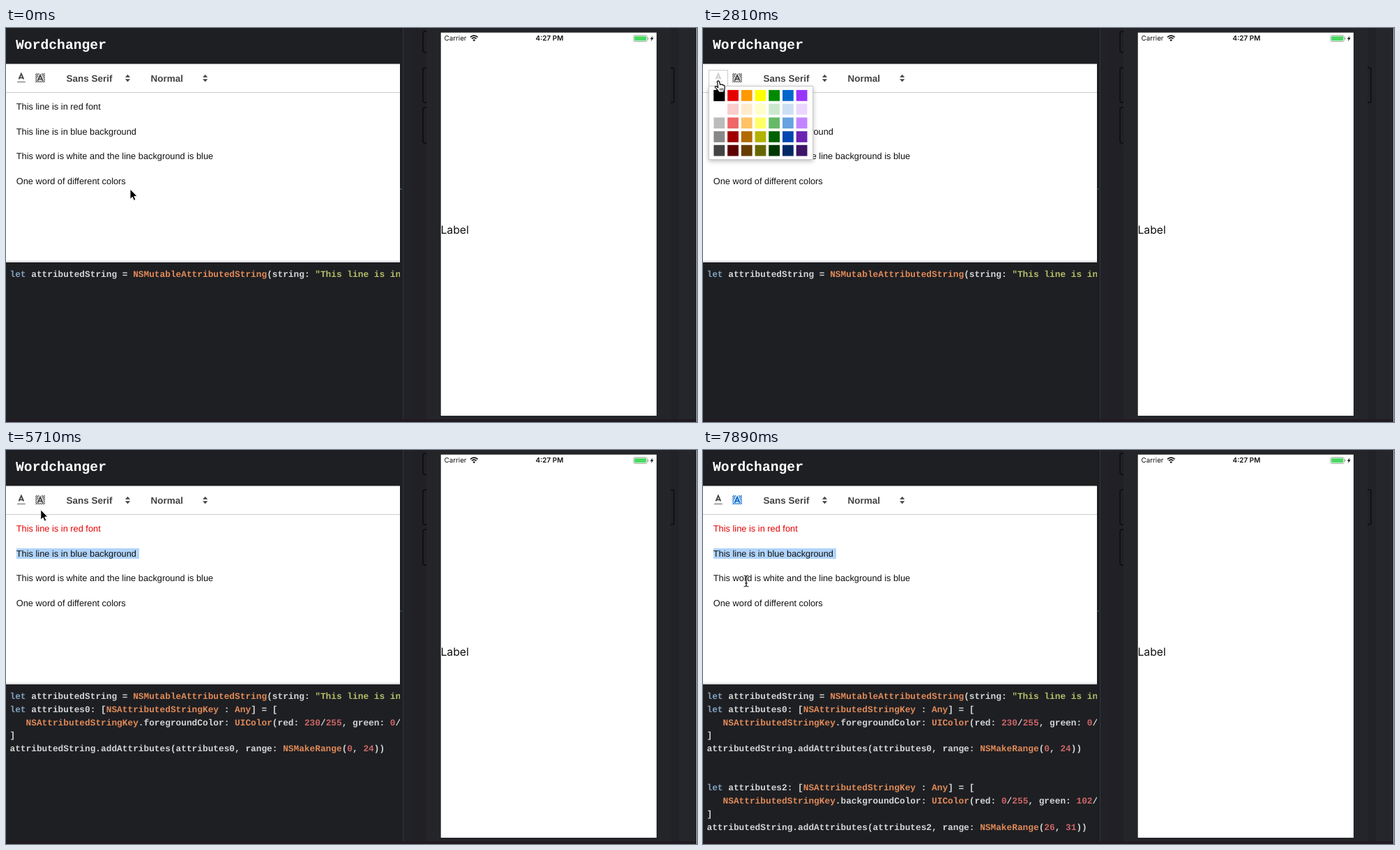
These frames come from a looping animation (991 px wide and 565 px high, 8000 ms). An HTML page:

```html
<!DOCTYPE html>
<html lang="en">
<head>
<meta charset="utf-8">
<title>Attributed string editor</title>
<style>
html, body { margin: 0; width: 100%; height: 100%; overflow: hidden; background: #1e1f23; }
svg { display: block; width: 991px; height: 565px; }
text { white-space: pre; text-rendering: geometricPrecision; }
.editor { font: 12.8px "Liberation Sans", Arial, sans-serif; fill: #111; }
.tool { font: bold 13.5px "Liberation Sans", Arial, sans-serif; fill: #444; }
.code { font: bold 12.8px "Liberation Mono", monospace; fill: #d3d5d4; }
.title { font: bold 19.7px "Liberation Mono", monospace; fill: #fff; }
.phone { font: 10px Inter, Roboto, sans-serif; fill: #111; }
.picker { filter: drop-shadow(0 2px 3px rgba(0, 0, 0, .28)); }
</style>
</head>
<body>
<svg id="stage" viewBox="0 0 991 565" xmlns="http://www.w3.org/2000/svg"></svg>
<script>
const LOOP = 8000;
const stage = document.getElementById('stage');
const rect = (x, y, w, h, fill, more = '') =>
  `<rect x="${x}" y="${y}" width="${w}" height="${h}" fill="${fill}" ${more}/>`;
const label = (cls, x, y, str, more = '') => `<text class="${cls}" x="${x}" y="${y}" ${more}>${str}</text>`;

// Code panel
const paint = { kw: '#81a2be', type: '#e08a58', str: '#b5bd68', num: '#cc6666' };
const kindOf = s => s[0] === '"' ? 'str' : s === 'let' ? 'kw' : /^\d/.test(s) ? 'num' : 'type';
const highlight = line => line.replace(/"[^"]*|\blet\b|\bNS\w+|\bUIColor\b|\bAny\b|\b\d+\b/g,
  s => `<tspan fill="${paint[kindOf(s)]}">${s}</tspan>`);
const codeLines = (lines, row) => lines.map((line, i) =>
  label('code', 5.5, 357 + (row + i) * 18.75, highlight(line))).join('');
const attributeBlock = (n, key, color, range) => [
  `let attributes${n}: [NSAttributedStringKey : Any] = [`,
  `   NSAttributedStringKey.${key}: UIColor(${color}`,
  ']',
  `attributedString.addAttributes(attributes${n}, range: NSMakeRange(${range}))`
];

// Colour picker
const swatches = [
  '#000 #e60000 #f90 #ff0 #008a00 #06c #93f',
  '#fff #facccc #ffebcc #ffffcc #cce8cc #cce0f5 #ebd6ff',
  '#bbb #f06666 #ffc266 #ff6 #66b966 #66a3e0 #c285ff',
  '#888 #a10000 #b26b00 #b2b200 #006100 #0047b2 #6b24b2',
  '#444 #5c0000 #663d00 #660 #003700 #002966 #3d1466'
].map(row => row.split(' '));
const PITCH = 19.72, CELL = 15.8;
const cellX = (left, col) => left + 7.4 + col * PITCH;
const cellY = row => 88.9 + row * PITCH;
const border = (x, y) => rect(x + .5, y + .5, CELL - 1, CELL - 1, 'none', 'stroke="#000"');
const picker = (id, left, pickedRow) => `<g id="${id}">
  ${rect(left + .5, 60.5, 27, 24, '#fff', 'stroke="#ccc"')}
  ${rect(left + .5, 83.5, 149, 105, '#fff', 'stroke="#ccc" class="picker"')}
  ${swatches.map((row, r) => row.map((c, i) => rect(cellX(left, i), cellY(r), CELL, CELL, c)).join('')).join('')}
  ${border(cellX(left, 0), cellY(pickedRow))}</g>`;

// Toolbar icons
const letterA = dy => `M5.5 ${11 + dy}L9 ${3 + dy}L12.5 ${11 + dy}M6.4 ${9 + dy}H11.6`;
const icons = `
  <g id="ink" transform="translate(13 62.6) scale(.985)" fill="none">
    <path d="${letterA(0)}" stroke="currentColor" stroke-width="1.8"/>
    <path id="inkBar" d="M3 15H15" stroke-width="2" opacity=".5"/></g>
  <g id="fill" transform="translate(40.2 62.6) scale(.985)" fill="none">
    <g clip-path="url(#iconBox)"><path stroke="currentColor" stroke-width="1.1"
      d="${Array.from({ length: 11 }, (_, i) => `M${i * 2.8 - 12} 16l14-14`).join('')}"/></g>
    <path d="${letterA(2)}" stroke="#fff" stroke-width="4"/>
    <path d="${letterA(2)}" stroke="currentColor" stroke-width="1.9"/></g>`;
const arrows = x => `<path d="M${x - 3.6} 70.8L${x} 66.8L${x + 3.6} 70.8ZM${x - 3.6} 73.3L${x} 77.3L${x + 3.6} 73.3Z" fill="#444"/>`;

// Simulator side
const outline = (x, y, h, dir) =>
  `<path d="M${x + 5 * dir} ${y}H${x + 3 * dir}Q${x} ${y} ${x} ${y + 3}V${y + h - 3}Q${x} ${y + h} ${x + 3 * dir} ${y + h}H${x + 5 * dir}" fill="none" stroke="#0c0c0f" stroke-width="1.4"/>`;
const simulator = `
  ${rect(565, 0, 426, 565, '#25262b')}${rect(565, 0, 4, 565, '#1d1e22')}${rect(569, 0, 1, 565, '#33343d')}
  ${rect(570, 0, 13, 565, '#212227')}${rect(583, 0, 20, 565, '#202025')}${rect(603, 0, 350, 565, '#242529')}
  ${rect(953, 0, 12, 565, '#212227')}
  ${outline(598, 5, 30, 1)}${outline(598, 57, 50, 1)}${outline(598, 114, 51, 1)}${outline(958, 57, 50, -1)}
  ${rect(0, 561, 991, 4, '#211b21')}${rect(990.2, 0, .8, 565, '#ddd')}
  ${rect(623.7, 6.6, 309.3, 549.4, '#fff')}
  ${label('phone', 628.5, 18.4, 'Carrier', 'style="font-size:9.8px"')}
  ${label('phone', 779.5, 18.4, '4:27 PM', 'text-anchor="middle" style="font-weight:600"')}
  ${label('phone', 623.4, 295.2, 'Label', 'style="font-size:15.8px"')}
  <g fill="none" stroke="#111" stroke-width="1.7"><path d="M666 13.2Q671.2 8.6 676.6 13.2M668 15.4Q671.2 12.4 674.6 15.4"/></g>
  <path d="M669.4 17L671.2 19.2L673.1 17Q671.2 15.6 669.4 17Z" fill="#111"/>
  ${rect(900, 10.5, 19.4, 9, 'none', 'rx="2" stroke="#999" stroke-width=".8"')}
  ${rect(901.2, 11.7, 17, 6.6, '#4cd964', 'rx="1"')}${rect(920.3, 13.4, 1.2, 3.2, '#999', 'rx=".6"')}
  <path d="M927.6 11L923.8 15.7H926L924.9 19.2L928.8 14.3H926.5Z" fill="#111"/>
  <path id="dot" d="M565 231H568" stroke="#2e7a55" stroke-width="1.4"/>`;

// Pointers, drawn around their hot spot
const beam = 'M-3.4-8Q-.6-8 0-6.4Q.6-8 3.4-8M0-6.6V6.6M-3.4 8Q-.6 8 0 6.4Q.6 8 3.4 8M-1.8 3H1.8';
const pointers = `
  <path id="arrow" d="M0 0V14.5L3.3 11.4L5.4 16.4L8 15.3L5.8 10.4H10.2Z" fill="#000" stroke="#fff"/>
  <g id="beam" fill="none"><path d="${beam}" stroke="#fff" stroke-width="2.4" opacity=".7"/><path d="${beam}" stroke="#000" stroke-width="1.2"/></g>
  <g id="hand" stroke="#000" stroke-linejoin="round">
    <path d="M-1.6 1C-1.2-.4 .8-.4 1.3 1L2.6 5.4C3 4.5 4.6 4.5 5 5.6C5.6 4.9 6.8 5.2 7 6.2C8 5.8 8.9 6.4 9 7.6L9.2 10C9.2 12 8 13 7.8 16H.8C.6 14.5-1.4 13-4.6 9C-5.2 7.6-3.6 6.8-2.4 8L-.4 9.6Z" fill="#fff" stroke-width="1.2"/>
    <path d="M2.4 10.5L2.7 13.6M4.5 10.3V13.6M6.5 10.2L6.3 13.6" stroke-width=".8"/></g>`;

const rows = [117, 152.5, 188, 223.5];
stage.innerHTML = `
  <defs><clipPath id="left"><rect width="565" height="565"/></clipPath>
    <clipPath id="iconBox"><rect x="2" y="2.4" width="14" height="13.4"/></clipPath></defs>
  ${rect(0, 0, 991, 565, '#1e1f23')}
  ${simulator}
  ${label('title', 14, 29.6, 'Wordchanger')}
  ${rect(0, 51.5, 565, 284.5, '#fff')}${rect(0, 92, 565, 1, '#ccc')}${rect(0, 334, 565, 1, '#ccc')}
  ${label('tool', 86.4, 77, 'Sans Serif')}${arrows(174.5)}${label('tool', 207.4, 77, 'Normal')}${arrows(285.7)}
  ${rect(15, 141, 172, 15, '#4a96e8', 'id="marked"')}
  ${rect(0, 0, 0, 15, '#b0d4fb', 'id="selection"')}
  ${['This line is in red font', 'This line is in blue background',
    'This word is white and the line background is blue', 'One word of different colors']
    .map((s, i) => label('editor', 14.8, rows[i], s, `id="line${i}"`)).join('')}
  <g clip-path="url(#left)">
    ${codeLines(['let attributedString = NSMutableAttributedString(string: "This line is in red font'], 0)}
    <g id="block0">${codeLines(attributeBlock(0, 'foregroundColor', 'red: 230/255, green: 0/255', '0, 24'), 1)}</g>
    <g id="block1">${codeLines(attributeBlock(2, 'backgroundColor', 'red: 0/255, green: 102/255', '26, 31'), 7)}</g>
  </g>
  ${picker('inkPicker', 8, 0)}${picker('fillPicker', 35.5, 1)}
  ${icons}
  <g id="hover">${border(0, 0)}</g>
  <g id="pointer">${pointers}</g>`;

const el = {};
stage.querySelectorAll('[id]').forEach(n => el[n.id] = n);
const show = (node, on) => node.setAttribute('display', on ? 'inline' : 'none');

// Pointer trips: first step, last step, number of steps, destination
const trips = [
  [90, 90, 1, 165, 217], [240, 330, 2, 134, 132], [600, 960, 5, 117, 124], [1340, 1340, 1, 110, 116],
  [1940, 2300, 5, 49, 82], [2470, 2640, 3, 22, 76], [3170, 3530, 5, 41, 94], [4080, 4470, 5, 53, 152],
  [5450, 5880, 6, 49, 69], [6400, 6840, 6, 145, 96], [7410, 7890, 6, 62, 188]
];
const ease = p => p * (1.6 - .6 * p);
function pointerAt(t) {
  let x = 178, y = 231;
  for (const [from, to, n, tx, ty] of trips) {
    if (t < from) break;
    const done = n === 1 ? 1 : Math.min(n, 1 + Math.floor((t - from) / (to - from) * (n - 1) + 1e-6));
    const p = ease(done / n);
    x += (tx - x) * p;
    y += (ty - y) * p;
  }
  return { x, y };
}

// Selections: start, end, x, y, width
const selections = [
  [1490, 1580, 92, 105, 19], [1580, 2730, 15, 105, 124], [3700, 4640, 15, 105, 124],
  [4910, 5180, 42, 141, 20], [5180, 5960, 15, 141, 176], [7110, LOOP, 15, 141, 176]
];
const within = (t, a, b) => t >= a && t < b;

function draw(t) {
  const { x, y } = pointerAt(t);
  const inkOpen = within(t, 2730, 3700), fillOpen = within(t, 5960, 7110);
  const open = inkOpen || fillOpen;
  const onBar = within(y, 60, 84.5);
  const overInk = onBar && within(x, 8, 36), overFill = onBar && within(x, 36, 63);
  const inkActive = within(t, 3700, 4730);

  show(el.inkPicker, inkOpen);
  show(el.fillPicker, fillOpen);
  show(el.block0, t >= 3700);
  show(el.block1, t >= 7110);
  show(el.marked, t >= 7110);
  el.line0.style.fill = t >= 3700 ? '#e60000' : '#111';
  el.dot.setAttribute('d', t < 1170 ? 'M565 231H568' : 'M565.6 231H567.4');

  const inkColor = inkOpen ? '#ccc' : overInk || inkActive ? '#06c' : '#444';
  el.ink.style.color = inkColor;
  el.inkBar.setAttribute('stroke', inkActive ? '#e60000' : inkColor);
  el.fill.style.color = fillOpen ? '#ccc' : overFill || t >= 7110 ? '#06c' : '#444';

  const sel = selections.find(s => within(t, s[0], s[1]));
  show(el.selection, sel);
  if (sel) ['x', 'y', 'width'].forEach((k, i) => el.selection.setAttribute(k, sel[i + 2]));

  const left = inkOpen ? 8 : 35.5;
  const col = Math.floor((x - cellX(left, 0)) / PITCH), row = Math.floor((y - cellY(0)) / PITCH);
  const hit = open && within(col, 0, 7) && within(row, 0, 5);
  show(el.hover, hit);
  if (hit) el.hover.setAttribute('transform', `translate(${cellX(left, col)} ${cellY(row)})`);

  const kind = t < 90 ? 'arrow' : open || overInk || overFill ? 'hand' : y < 92 ? 'arrow' : 'beam';
  for (const k of ['arrow', 'beam', 'hand']) show(el[k], k === kind);
  el.pointer.setAttribute('transform', `translate(${x} ${y})`);
}

const start = performance.now();
function tick() {
  draw((performance.now() - start) % LOOP);
  requestAnimationFrame(tick);
}
tick();
</script>
</body>
</html>
```
